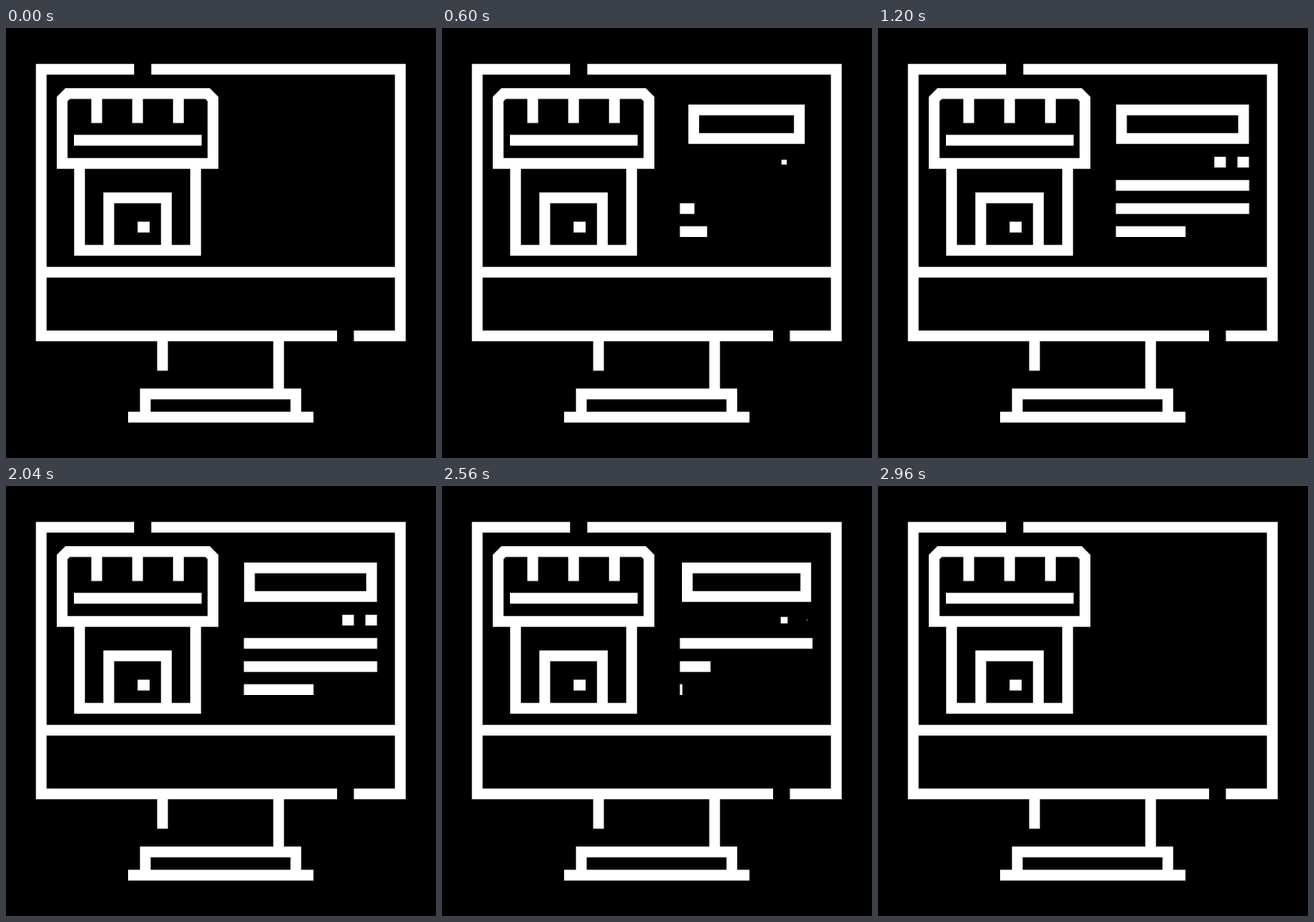
Write an HTML page that moves like this. It is 500x500 px and loops after 3 s.

```html
<!DOCTYPE html>
<html lang="en">
<head>
<meta charset="utf-8">
<title>Online shop</title>
<style>
  html, body { margin: 0; width: 100%; height: 100%; overflow: hidden; background: #000; }
  svg { display: block; width: 100vw; height: 100vh; }
  .outline { fill: none; stroke: #fff; stroke-width: 12.5; }
</style>
</head>
<body>
<svg viewBox="0 0 500 500">
  <g class="outline">
    <!-- monitor -->
    <path d="M149 48H41V358H385M404.5 358H458.5V48H169M41 284H458"/>
    <!-- stand -->
    <path d="M182 358V398.5M317 358V425M162 452V425.5H337V452M142 452.5H357.5"/>
    <!-- shop -->
    <path d="M65.3 157.5V82.6L71.6 76.3H234.4L240.7 82.6V157.5ZM79 130.5H227.5"/>
    <path id="awning"/>
    <path d="M85.5 158V258.5H220.5V158M119.5 258V197.5H186.5V258M153 231.5H167"/>
  </g>
  <path id="panel" fill="#fff" fill-rule="evenodd"/>
</svg>
<script>
const LOOP = 3000, STEP = 40;
const WEIGHT = 12.5;   // outline thickness
const GAP = 26.85;     // distance between neighbouring rows and dots
const LEFT = 276.6;    // left edge of the panel
const FULL = 155;      // panel width

const byId = id => document.getElementById(id);
const repeat = (n, fn) => Array.from({ length: n }, (_, i) => fn(i)).join("");

byId("awning").setAttribute("d", repeat(3, i => `M${105.5 + 47.5 * i} 77v33.5`));

const box = (x, y, w, h) => w > 0 && h > 0 ? `M${x} ${y}h${w}v${h}h${-w}z` : "";
const centered = (cx, cy, w, h) => box(cx - w / 2, cy - h / 2, w, h);

// cubic-bezier(.4, 0, .2, 1), solved by bisection
function ease(t) {
  if (t <= 0) return 0;
  if (t >= 1) return 1;
  let lo = 0, hi = 1;
  for (let i = 0; i < 24; i++) {
    const u = (lo + hi) / 2, v = 1 - u;
    if (1.2 * u * v * v + 0.6 * u * u * v + u * u * u < t) lo = u;
    else hi = u;
  }
  return lo * lo * (3 - 2 * lo);
}

const ramp = (t, start, duration) => ease((t - start) / duration);

// The frame widens from its centre with a constant outline.
function frame(t) {
  const w = (FULL - 0.5) * (ramp(t, 300, 500) - ramp(t, 2514, 446));
  const cx = LEFT + FULL / 2, cy = 111.9, h = 45.8;
  return centered(cx, cy, w, h) + centered(cx, cy, w - 2 * WEIGHT, h - 2 * WEIGHT);
}

// Dots grow from left to right and shrink from right to left.
function dot(t, i) {
  const p = ramp(t, 400 + 215 * i, 600) - ramp(t, 2390 - 195 * i, 545);
  return centered(397.8 + GAP * i, 156, 13.4 * p, WEIGHT * p);
}

// Rows are counted from the bottom, which moves first.
function row(t, i) {
  const p = ramp(t, 390 + 105 * i, 680 - 110 * i) - ramp(t, 2040 + 250 * i, 680 - 135 * i);
  return box(LEFT, 230.5 - GAP * i, (i ? FULL : 81) * p, WEIGHT);
}

function draw() {
  const t = Math.floor(performance.now() % LOOP / STEP) * STEP;
  byId("panel").setAttribute("d",
    frame(t) + repeat(2, i => dot(t, i)) + repeat(3, i => row(t, i)));
  requestAnimationFrame(draw);
}
draw();
</script>
</body>
</html>
```
